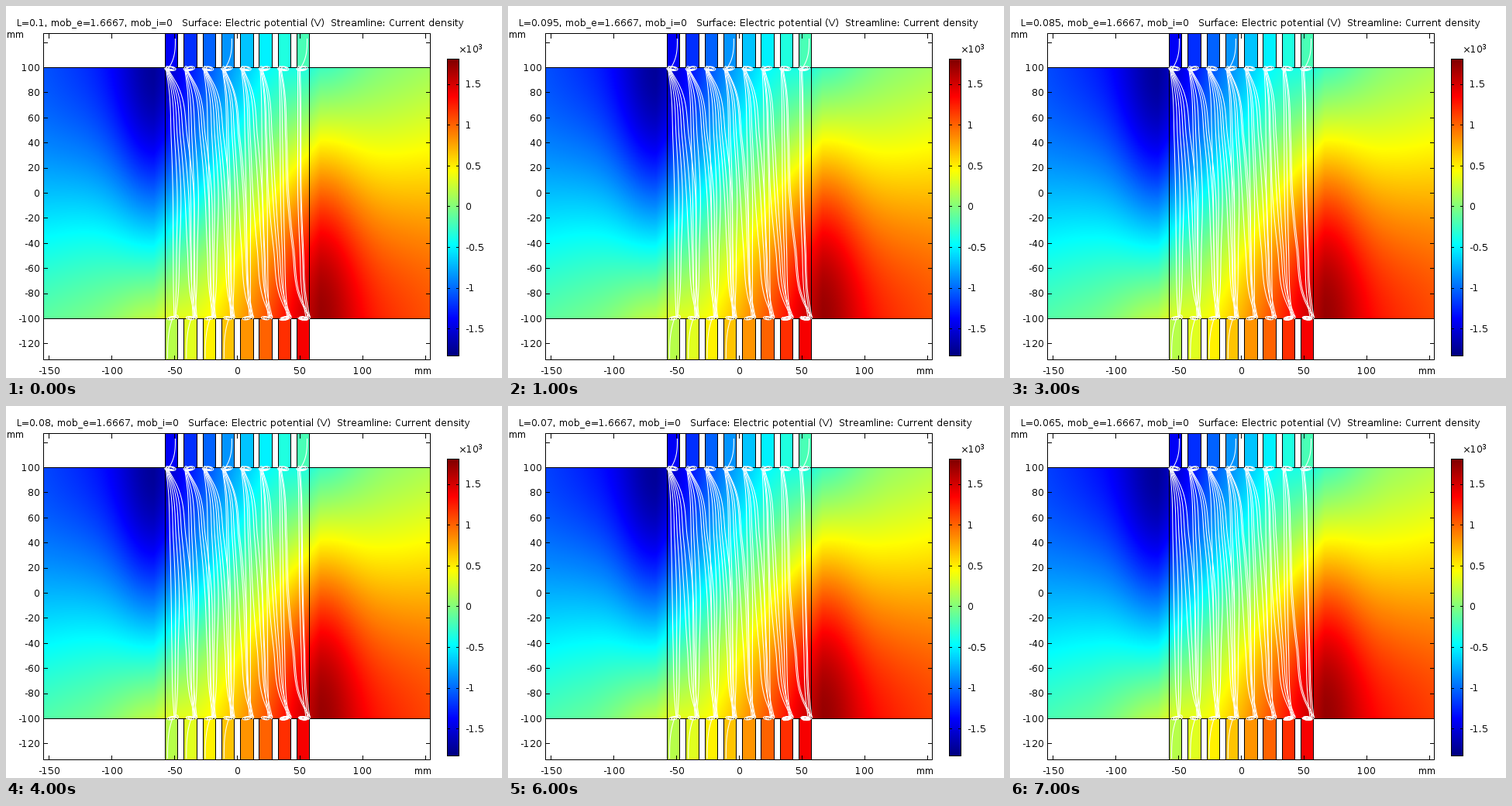
A matplotlib script that plays this animation: 640x480 px, repeating every 8000 ms.

```python
import numpy as np
import matplotlib.pyplot as plt
from matplotlib.animation import FuncAnimation
from matplotlib.collections import LineCollection
from matplotlib.colors import LinearSegmentedColormap
from matplotlib.patches import Rectangle

W, H, DPI = 640, 480, 100
FRAMES, INTERVAL = 8, 1000
PX = 72 / DPI
CX, CY, SCALE = 298.5, 241.5, 1.618
LEFT, RIGHT, TOP, BOTTOM = 48, 548, 80, 404
BOX_TOP, BOX_BOTTOM = 35.5, 456.5
STRIPS, STRIP_W = 8, 16.4

plt.rcParams.update({"font.family": "DejaVu Sans", "text.hinting": "native",
                     "text.hinting_factor": 1})
JET = LinearSegmentedColormap.from_list("jet6", [
    (0, (0, 0, .5)), (.125, (0, 0, 1)), (.375, (0, 1, 1)),
    (.625, (1, 1, 0)), (.875, (1, 0, 0)), (1, (.5, 0, 0))], N=512)


def potential(s):
    """Relative potential, antisymmetric about the centre; s runs 0 to 1."""
    x = (np.arange(LEFT, RIGHT) + .5 - CX) / 250
    y = (CY - np.arange(TOP, BOTTOM)[:, None] - .5) / 162
    r = abs(x)
    bump = np.exp(-((r - .43) / .2) ** 2)
    mean = np.minimum(.64 * r, .185 + .09 * bump)
    slope = .2 - .07 * r ** 2 + .08 * bump
    bend = -.06 * bump - .022 * r
    rise = (y + np.sin(np.pi * y / 2)) / 2
    drift = .02 * s * np.clip((r - .37) / .4, 0, 1)
    return .5 + np.sign(x) * (mean + bend * y ** 2 + drift) - slope * rise


def strip_x(i):
    return 205.5 + 24.29 * i


def strip_level(i):
    return .118 + .054 * i - .001 * i * i


def hermite(x, xp, fp):
    """Smooth curve through a few points."""
    xp, fp = np.asarray(xp, float), np.asarray(fp, float)
    slope = np.gradient(fp, xp)
    k = np.clip(np.searchsorted(xp, x) - 1, 0, len(xp) - 2)
    h = xp[k + 1] - xp[k]
    u = (x - xp[k]) / h
    return ((1 + 2 * u) * (1 - u) ** 2 * fp[k] + u * (1 - u) ** 2 * h * slope[k]
            + u * u * (3 - 2 * u) * fp[k + 1] + u * u * (u - 1) * h * slope[k + 1])


def streamline(a, m, b):
    y = np.linspace(82, 401, 60)
    xs = [a, a + .4 * (m - a), a + .75 * (m - a), m,
          m + .25 * (b - m), m + .6 * (b - m), b]
    return np.c_[hermite(y, [82, 105, 170, CY, 313, 378, 401], xs), y]


def spiral(x, y, rx, ry, turns, tilt=0.):
    a = np.linspace(0, 2 * np.pi * turns, int(28 * turns))
    r = .25 + .75 * a / a[-1]
    dx = rx * r * np.cos(a)
    return np.c_[x + dx, y + ry * r * np.sin(a) + tilt * dx]


def tail(x0, x1, y0, y1):
    u = np.linspace(0, 1, 16)
    return np.c_[x0 + (x1 - x0) * u ** 3, y0 + (y1 - y0) * u]


def bundle(i, s, rng):
    """Lines fanning out below strip i and closing in on the strips beneath."""
    spread = 36 * (1 - (i / 7.5) ** 2)
    outward = 4 * s * ((i == STRIPS - 1) - (i == 0))
    a = strip_x(i) + 1
    paths = []
    for u in np.linspace(0, 1, round(3 + spread / 12)):
        m = a + spread * (.22 + .78 * u) + rng.uniform(-1.5, 1.5) + outward
        end = min(i + (u > .4), STRIPS - 1)
        b = strip_x(end) + STRIP_W - 5 * (1 - u)
        paths.append(streamline(a + 3 * u, m, b))
    return paths


def stream_paths(s):
    rng = np.random.default_rng(5)
    paths = []
    for i in range(STRIPS):
        x = strip_x(i)
        c = x + STRIP_W / 2
        lean = .12 * (-1) ** i
        turns = 2 + (1.5 + s if i > 5 else 0)
        paths += bundle(i, s, rng)
        paths += [spiral(c - 1, 80.5, 7.5, 3.2, 2.5, lean),
                  spiral(c - 6, 80, 3, 3.5, 1.5),
                  spiral(c, 403, 7, 2.6, turns, -lean),
                  spiral(c + 6, 401, 3, 3, 1.2)]
        if i in (0, 3, 7):
            paths.append(tail(x + 13, x + 5, 42, 79))
        if i < 4:
            paths.append(tail(x + 3, x + 9, 455, 404))
    return paths


fig = plt.figure(figsize=(W / DPI, H / DPI), dpi=DPI, facecolor="white")
ax = fig.add_axes([0, 0, 1, 1])
ax.axis("off")


def line(x0, y0, x1, y1):
    ax.plot([x0, x1], [y0, y1], color="black", lw=PX, zorder=3,
            solid_capstyle="butt", snap=False)


def hline(y, x0, x1):
    y = np.floor(y) + .5
    line(x0, y, x1, y)


def vline(x, y0, y1):
    x = np.floor(x) + .5
    line(x, y0, x, y1)


def box(x0, y0, x1, y1):
    ax.add_patch(Rectangle((x0, y0), x1 - x0, y1 - y0, fill=False, ec="black",
                           lw=PX, zorder=4, snap=False))


def label(x, y, text, ha="left", size=12.02):
    return ax.text(x, y, text, ha=ha, va="baseline", fontsize=size * PX, zorder=6)


def draw_strips():
    for i in range(STRIPS):
        x0 = strip_x(i)
        x1 = x0 + STRIP_W
        levels = strip_level(i), 1 - strip_level(STRIPS - 1 - i)
        for y0, y1, t in zip((36, BOTTOM), (TOP, 456), levels):
            ax.add_patch(Rectangle((x0, y0), STRIP_W, y1 - y0, fc=JET(t),
                                   ec="none", zorder=2, snap=False))
            vline(x0, y0, y1)
            vline(x1, y0, y1)


def draw_axes():
    box(LEFT + .5, BOX_TOP, RIGHT - .5, BOX_BOTTOM)
    for y in (79, 403):
        hline(y, LEFT, RIGHT)
    for x in (205, 391):
        vline(x, TOP, BOTTOM)
    for v in range(-150, 151, 50):
        x = CX + v * SCALE
        vline(x, 36, 42)
        vline(x, 451, 457)
        if v < 150:
            label(x, 475, str(v), "center")
    for v in range(-120, 121, 20):
        y = CY - v * 1.62
        hline(y, LEFT, 54)
        hline(y, 542, RIGHT)
        if v < 120:
            label(44, y + 4.3, str(v), "right")
    label(527.5, 475, "mm")
    label(1.5, 41, "mm")


def draw_colorbar():
    ax.imshow(np.linspace(1, 0, 383)[:, None], cmap=JET, vmin=0, vmax=1,
              extent=(569, 585, 452, 68), aspect="auto", zorder=2)
    box(569.5, 68.5, 584.5, 451.5)
    for k in range(-3, 4):
        y = 258.9 - 52.6 * k
        hline(y, 569, 573)
        hline(y, 581, 585)
        label(592.5, y + 4.3, f"{k / 2:g}")
    label(584, 60, "×10")
    label(609.5, 55.5, "3", size=9)


image = ax.imshow(potential(0), cmap=JET, vmin=0, vmax=1, interpolation="nearest",
                  extent=(LEFT, RIGHT, BOTTOM, TOP), aspect="auto", zorder=1)
draw_strips()
draw_axes()
draw_colorbar()
streams = ax.add_collection(
    LineCollection([], colors="white", linewidths=1.05 * PX, zorder=5))
title = label(14.3, 26, "")
ax.set_xlim(0, W)
ax.set_ylim(H, 0)


def update(i):
    s = i / (FRAMES - 1)
    image.set_data(potential(s))
    streams.set_segments(stream_paths(s))
    title.set_text(f"L={.1 - .005 * i:g}, mob_e=1.6667, mob_i=0   "
                   "Surface: Electric potential (V)  "
                   "Streamline: Current density")
    return image, streams, title


anim = FuncAnimation(fig, update, frames=FRAMES, interval=INTERVAL,
                     repeat=True, repeat_delay=0, blit=False)
plt.show()
```
